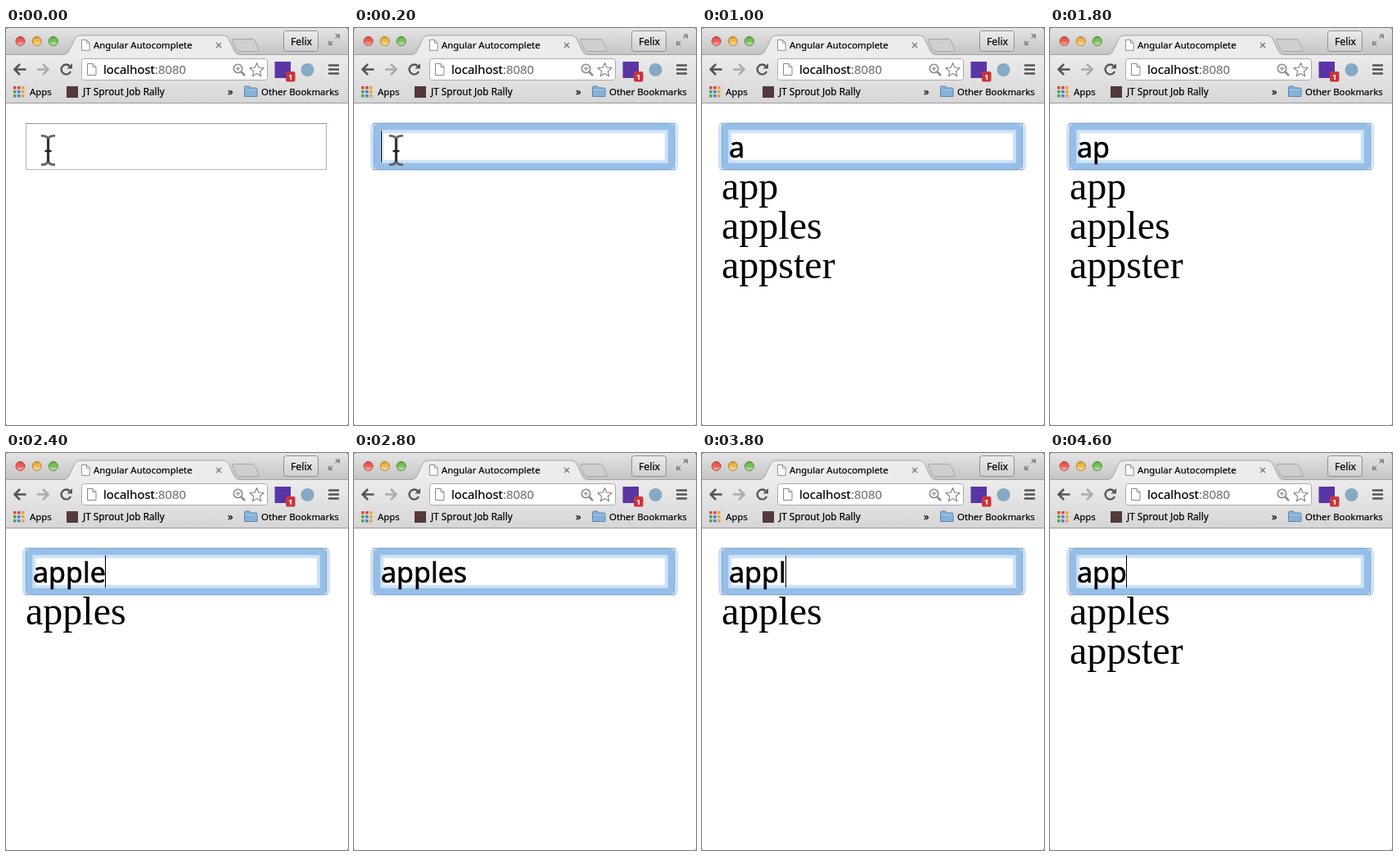
Animation, 418 px wide and 484 px high, one loop 4800 ms. Source, as an HTML page:

```html
<!DOCTYPE html>
<html lang="en">
<head>
<meta charset="utf-8">
<title>Autocomplete demo</title>
<style>
  html, body { margin: 0; width: 100%; height: 100%; overflow: hidden; background: #888; }
  svg { display: block; border-radius: 4px 4px 2px 2px; }
  text { font-family: "Noto Sans", "Open Sans", sans-serif; white-space: pre; }
  .ui { font-size: 11.4px; fill: #000; stroke: #000; stroke-width: .2px; }
  .list { font: 48px "Liberation Serif", "Times New Roman", serif; }
</style>
</head>
<body>
<svg width="418" height="484" viewBox="0 0 418 484">
  <defs>
    <linearGradient id="titleBar" x2="0" y2="1"><stop stop-color="#e4e4e4"/><stop offset="1" stop-color="#c3c3c3"/></linearGradient>
    <linearGradient id="toolBar" x2="0" y2="1"><stop stop-color="#ececec"/><stop offset="1" stop-color="#d6d6d6"/></linearGradient>
    <linearGradient id="button" x2="0" y2="1"><stop stop-color="#ececec"/><stop offset="1" stop-color="#cfcfcf"/></linearGradient>
    <linearGradient id="gloss" x2="0" y2="1"><stop stop-opacity=".2"/><stop offset=".45" stop-color="#fff" stop-opacity="0"/><stop offset="1" stop-color="#fff" stop-opacity=".6"/></linearGradient>
    <filter id="soft"><feGaussianBlur stdDeviation=".7"/></filter>
    <g id="sheet" fill="#fff" stroke="#888"><path d="M.5.5h6.500l4 4v10h-10.500z"/><path d="M7 .5v4h4" fill="none"/></g>
  </defs>

  <rect width="418" height="484" fill="#fff"/>
  <rect width="418" height="33" fill="url(#titleBar)"/>
  <rect y="33" width="418" height="58" fill="url(#toolBar)"/>
  <path d="M0 91.500h418" stroke="#989898"/>

  <circle cx="17.500" cy="16" r="5.500" fill="#ee5850" stroke="#b0453f"/>
  <circle cx="37.700" cy="16" r="5.500" fill="#f2b544" stroke="#b0812f"/>
  <circle cx="57.800" cy="16" r="5.500" fill="#74bf52" stroke="#52883d"/>
  <path d="M12.500 16a5 5 0 0 1 10 0a5 5 0 0 1-10 0M32.700 16a5 5 0 0 1 10 0a5 5 0 0 1-10 0M52.800 16a5 5 0 0 1 10 0a5 5 0 0 1-10 0" fill="url(#gloss)"/>
  <path d="M0 32.500H71Q75 32 77 28L84 13Q86 9 90 9H265Q270 9 272 13L279 28Q281 32 285 32.500H418V34H0z" fill="#ececec"/>
  <path d="M0 32.500H71Q75 32 77 28L84 13Q86 9 90 9H265Q270 9 272 13L279 28Q281 32 285 32.500H418" fill="none" stroke="#a3a3a3"/>
  <path d="M278 13.500H300Q303 13.500 304.500 16L309 26Q309.500 28.500 307 28.500H286Q283 28.500 281.500 26L277 16Q276 13.500 278 13.500z" fill="#cfcfcf" stroke="#a6a6a6"/>
  <use href="#sheet" transform="translate(92 14) scale(.92)"/>
  <text class="ui" x="107" y="25">Angular Autocomplete</text>
  <path d="M257 18l6 6m0-6l-6 6" stroke="#777" stroke-width="1.300"/>
  <rect x="339.500" y="3.500" width="42" height="25" rx="3" fill="url(#button)" stroke="#8f8f8f"/>
  <text class="ui" x="361" y="20.500" text-anchor="middle" style="font-size:12.300px">Felix</text>
  <g fill="#888" stroke="#888" stroke-width="1.500">
    <path d="M402.500 12.500l4-4M399 16l-4 4"/>
    <path d="M402 7.500h6v6zM394 15v6h6z" stroke="none"/>
  </g>

  <path d="M24.500 50.500H11M17 44l-6.500 6.500L17 57" fill="none" stroke="#555" stroke-width="2.600"/>
  <path d="M38 50.500H51.500M45 44l6.500 6.500L45 57" fill="none" stroke="#aaa" stroke-width="2.600"/>
  <path d="M78 46.500A6 6 0 1 0 79 53" fill="none" stroke="#555" stroke-width="2.300"/>
  <path d="M81 43v6.500h-6.500z" fill="#555"/>
  <rect x="92.500" y="37.500" width="227" height="26" rx="3" fill="#fff" stroke="#a9a9a9"/>
  <use href="#sheet" x="99" y="43"/>
  <text x="119" y="56" font-size="14.900" stroke="#000" stroke-width=".2">localhost<tspan fill="#777" stroke="#777">:8080</tspan></text>
  <g fill="none" stroke="#8a8a8a">
    <circle cx="283.500" cy="49.500" r="5.200" stroke-width="1.600"/>
    <path d="M281 49.500h5m-2.500-2.500v5"/>
    <path d="M287.500 53.500l4.500 4.500" stroke-width="2.500"/>
    <path id="star" stroke-width="1.200" stroke-linejoin="round"/>
  </g>
  <rect x="328.500" y="41" width="19.500" height="20" fill="#5b35a5"/>
  <rect x="342" y="53" width="11.500" height="12.500" rx="2" fill="#c9363b"/>
  <text x="347.700" y="63" font-size="9.500" font-weight="bold" fill="#fff" text-anchor="middle">1</text>
  <circle cx="368.500" cy="51" r="8" fill="#86a9c4"/>
  <path d="M394 45.500h13M394 50.500h13M394 55.500h13" stroke="#555" stroke-width="2.600"/>

  <g id="apps"></g>
  <text class="ui" x="29" y="82">Apps</text>
  <rect x="74" y="71" width="14" height="14" fill="#54393a"/>
  <text class="ui" x="94" y="82" style="font-size:11.800px">JT Sprout Job Rally</text>
  <text class="ui" x="271" y="82" style="font-size:13px">»</text>
  <path d="M291.500 83.500V72.500q0-1.500 1.500-1.500h4.500l1.500 2h6.500q1.500 0 1.500 1.500v9z" fill="#86b1d8" stroke="#5b86ae"/>
  <path d="M292 75.500h14.500" stroke="#a9cbe8"/>
  <text class="ui" x="312" y="82">Other Bookmarks</text>

  <rect x="24.500" y="116.500" width="367" height="56" fill="#fff" stroke="#b3b3b3"/>
  <path d="M24 116.500h368" stroke="#949494"/>
  <g id="ring" fill="none">
    <g filter="url(#soft)">
      <rect x="28" y="120" width="360" height="49" rx="3" stroke="#cfe2f6" stroke-width="16.500"/>
      <rect x="28" y="120" width="360" height="49" rx="4.500" stroke="#95bee8" stroke-width="8.500"/>
    </g>
    <rect x="24.500" y="116.500" width="367" height="56" stroke="#8ba3bb" stroke-opacity=".8"/>
  </g>
  <text id="typed" x="33" y="158" font-size="34" stroke="#000" stroke-width=".6"></text>
  <rect id="caret" y="125" width="1" height="39"/>
  <text class="list" x="24" y="209"></text>
  <text class="list" x="24" y="257"></text>
  <text class="list" x="24" y="305"></text>
  <g id="pointer" fill="none" stroke="#333" filter="url(#soft)">
    <path d="M43 131.500q8-.5 8.500 5q.5-5.500 8.500-5M43 166.500q8 .5 8.500-5q.5 5.500 8.500 5" stroke="#666" stroke-width="2.800"/>
    <path d="M51.500 135v28" stroke-width="3.200"/>
    <path d="M47.500 150h8" stroke="#222" stroke-width="2.500"/>
  </g>
</svg>
<script>
const LOOP = 4800;
const words = ["app", "apples", "appster"];
// start, typed text, caret shown, text the suggestions follow
const steps = [
  [0, "", 0, ""], [200, "", 1, ""], [600, "", 0, ""],
  [800, "a", 1, ""], [1000, "a", 0, "a"], [1400, "a", 1, "a"],
  [1600, "ap", 1, "ap"], [1800, "ap", 0, "ap"],
  [2000, "app", 1, "app"], [2200, "appl", 1, "app"], [2400, "apple", 1, "apple"],
  [2600, "apples", 1, "apples"], [2800, "apples", 0, "apples"],
  [3200, "apples", 1, "apples"], [3400, "apples", 0, "apples"],
  [3600, "apple", 1, "apple"], [3800, "appl", 1, "appl"],
  [4000, "app", 1, "app"], [4200, "app", 0, "app"], [4600, "app", 1, "app"]
];
const $ = id => document.getElementById(id);
const rows = document.querySelectorAll(".list");
const show = (id, on) => $(id).setAttribute("visibility", on ? "visible" : "hidden");

const starPoints = Array.from({ length: 10 }, (_, i) => {
  const r = i % 2 ? 4 : 9, a = i * Math.PI / 5;
  return [306.5 + r * Math.sin(a), 51.5 - r * Math.cos(a)];
});
$("star").setAttribute("d", "M" + starPoints.join("L") + "z");

const appColors = ["#d9483b", "#d9483b", "#e9a23b", "#4ca454", "#4a80d6", "#e9a23b", "#4ca454", "#4a80d6", "#e9a23b"];
$("apps").innerHTML = appColors.map((c, i) =>
  `<rect x="${9 + i % 3 * 5}" y="${71 + Math.floor(i / 3) * 5}" width="3.5" height="3.5" fill="${c}"/>`).join("");

let current;
function draw(now) {
  const t = now % LOOP;
  const step = steps.findLast(s => s[0] <= t);
  if (step !== current) {
    current = step;
    const [start, text, caret, query] = step;
    const matches = words.filter(w => query && w !== query && w.startsWith(query));
    $("typed").textContent = text;
    rows.forEach((row, i) => row.textContent = matches[i] || "");
    $("caret").setAttribute("x", Math.floor(32.95 + (text ? $("typed").getComputedTextLength() : 0.1)));
    show("caret", caret);
    show("ring", start >= 200);
    show("pointer", start < 800);
  }
  requestAnimationFrame(draw);
}
draw(performance.now());
</script>
</body>
</html>
```
